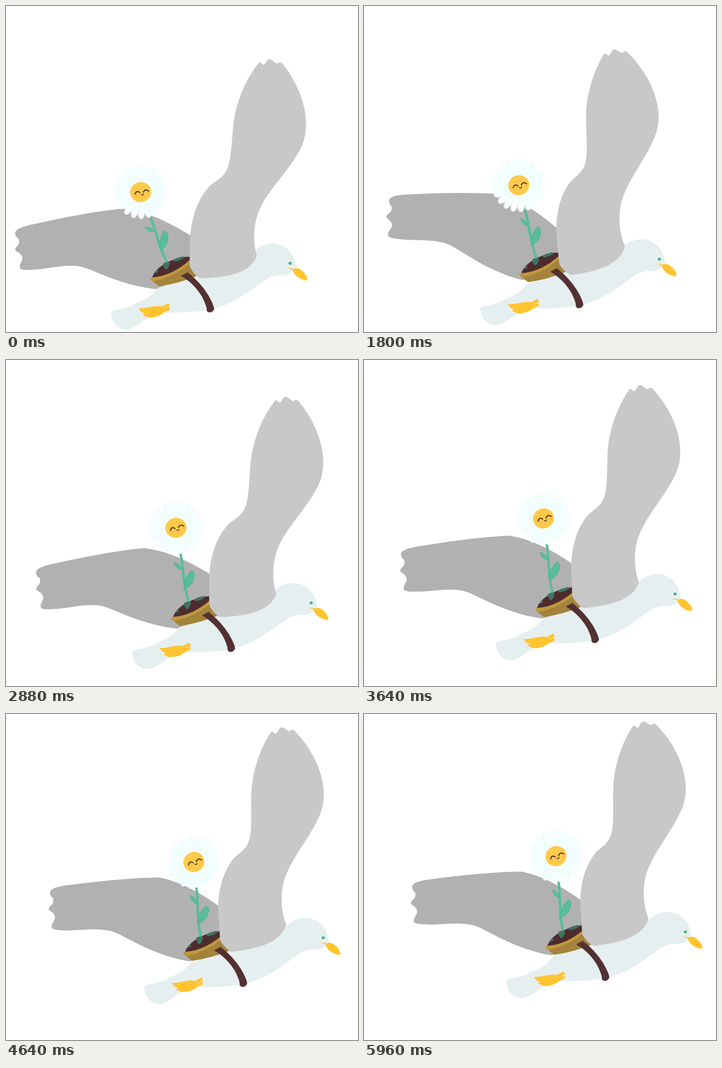
Animation of 700x650 px, one loop 6 s. Source, as an HTML page with a canvas:

```html
<!DOCTYPE html>
<html lang="en">
<head>
<meta charset="utf-8">
<title>Flying gull with a daisy</title>
<style>
html, body { margin: 0; width: 100%; height: 100%; overflow: hidden; background: #fff; }
canvas { display: block; }
</style>
</head>
<body>
<canvas id="stage" width="700" height="650"></canvas>
<script>
const ctx = document.getElementById('stage').getContext('2d');
const LOOP = 6000, FRAME = 40, STEP = 640;

// Motion tracks, one value every STEP ms
const track = {
  x: [0, 3.8, 12.8, 24.5, 36, 47, 56, 64, 70, 73.5, 74.3],
  y: [0, 0, -2.5, -10, -21.5, -36.5, -51, -64, -74, -78, -79.3],
  nearWing: [0, 4.2, 7.6, 6.3, 1.7, 1.2, 4.3, 5, 5.2, 5.2, 5.2],
  farWing: [0, 6.3, 11.1, 8.9, 1.4, 0.2, 4.5, 5.1, 5.1, 5.1, 5.1],
  drift: [0, 0, 0, 0, -2, -3.5, -5, -5.5, -5.5, -5.5, -5.5],
  plant: [0, 2.3, 4.7, 7.2, 9.6, 11.9, 14.1, 15, 15.1, 15.1, 15.1]
};

const shape = {
  farWing: 'M366 457C330 435 285 410 232 404C170 410 100 425 50 436Q18 443 18 453Q19 461 25 464Q29 474 20 481Q16 487 22 490C30 494 34 500 32 506C29 514 24 520 30 525Q36 527 50 526C80 525 105 517 130 518C150 517 165 525 185 533C225 550 265 562 305 565L380 545V464Z',
  nearWing: 'M499 498C490 470 492 430 506 402C525 362 566 325 587 282C610 235 591 165 548 113Q543 111 539 115C533 113 530 106 524 106C518 106 516 117 512 117C508 117 507 109 502 114C478 145 463 180 455 217C449 250 450 290 443 315C437 342 418 347 405 359C378 388 366 430 366 475L365 518Q372 535 386 543C440 541 485 534 499 498Z',
  body: 'M209 610C225 602 242 605 258 593C272 586 288 583 302 562L385 536L490 492C505 474 530 470 545 476C565 483 575 502 577 522C572 533 556 538 540 537C525 538 512 548 500 557C480 572 455 590 425 600C400 608 370 612 330 611C305 612 285 620 270 630C255 643 240 648 228 643C214 636 209 622 209 610Z',
  beak: 'M559 522L573 524Q580 520 590 529Q600 538 599 547Q588 547 578 539Q572 534 570 526Z',
  foot: 'M264 603Q276 603 288 600Q300 597 310 599L323 592L326 598L312 604L325 600L326 606Q316 609 309 615Q298 622 283 621L272 616L276 613Q268 611 264 603Z',
  strap: 'M348 538L361 531Q386 550 402 576Q413 595 414 604Q411 611 405 611Q400 610 399 607Q400 600 390 580Q374 553 348 538Z',
  soil: 'M290 543Q296 520 335 505Q355 498 370 501L368 508Q345 530 290 545Z',
  rim: 'M287 545Q288 541 291 541Q332 538 368 504L371 509Q335 542 291 549Z',
  pot: 'M291 548Q335 541 369 508L380 538Q345 553 304 559Z',
  moss: 'M312 514Q319 508 326 512Q325 520 319 526Q314 524 312 514ZM332 507L338 503L352 499L355 502L346 507L336 510ZM296 532Q299 526 303 527L301 532Z',
  stem: 'M286 419C299 446 300 473 322 515',
  smallLeaf: 'M295 450Q290 439 276 441Q281 451 295 450Z',
  bigLeaf: 'M306 487Q304 460 314 449Q324 449 322 466Q320 482 306 487Z',
  eyes: 'M-12 2Q-7 -6 -2 1M5 1Q10 -6 16 1',
  mouth: 'M0 4.5Q3 8 5 4.5'
};
for (const name in shape) shape[name] = new Path2D(shape[name]);

// Smooth curve through the values of a track
function sample(list, time) {
  const i = Math.floor(time / STEP), u = time / STEP - i;
  const a = list[Math.max(i - 1, 0)], b = list[i], c = list[i + 1];
  const d = list[Math.min(i + 2, list.length - 1)];
  return b + u / 2 * (c - a + u * (2 * a - 5 * b + 4 * c - d + u * (3 * (b - c) + d - a)));
}

function fill(name, color) {
  ctx.fillStyle = color;
  ctx.fill(shape[name]);
}

function line(name, color, width) {
  ctx.strokeStyle = color;
  ctx.lineWidth = width;
  ctx.stroke(shape[name]);
}

function oval(x, y, rx, ry, color) {
  ctx.fillStyle = color;
  ctx.beginPath();
  ctx.ellipse(x, y, rx, ry, 0, 0, 2 * Math.PI);
  ctx.fill();
}

function turn(degrees) {
  ctx.rotate(degrees * Math.PI / 180);
}

function spin(x, y, degrees) {
  ctx.translate(x, y);
  turn(degrees);
  ctx.translate(-x, -y);
}

function group(draw) {
  ctx.save();
  draw();
  ctx.restore();
}

function petals(color, edge, offset) {
  const count = 20;
  for (let i = 0; i < count; i++) group(() => {
    turn((i + offset) * 360 / count);
    oval(34, 0, 19.5, 6.8, color);
    ctx.strokeStyle = edge;
    ctx.lineWidth = 0.5;
    ctx.stroke();
  });
}

function face() {
  oval(0, 0, 21, 20, '#ffca4b');
  oval(-9, 6, 3, 2, '#ffb957');
  oval(14, 5, 3, 2, '#ffb957');
  line('eyes', '#4a2b20', 2);
  line('mouth', '#4a2b20', 1.5);
}

function render(time) {
  const pose = {};
  for (const name in track) pose[name] = sample(track[name], time);

  const tiltFarWing = () => spin(360, 480, pose.farWing);
  const bendPlant = () => spin(322, 517, pose.plant);
  const placeHead = () => {
    bendPlant();
    ctx.translate(268, 371);
    turn(-10 - 1.6 * pose.plant);
  };

  ctx.fillStyle = '#fff';
  ctx.fillRect(0, 0, 700, 650);
  ctx.lineCap = 'round';

  group(() => {
    ctx.translate(pose.x, pose.y);
    group(() => { tiltFarWing(); fill('farWing', '#b1b1b1'); });

    fill('body', '#e6efef');
    fill('soil', '#4e2c2e');
    fill('pot', '#a4833a');
    fill('rim', '#c0983d');

    group(() => {
      bendPlant();
      ctx.lineCap = 'butt';
      line('stem', '#57bd9b', 5);
      fill('bigLeaf', '#57bd9b');
      line('bigLeaf', '#48a888', 0.6);
      spin(295, 450, 2.4 * pose.nearWing);
      fill('smallLeaf', '#57bd9b');
      line('smallLeaf', '#48a888', 0.6);
    });
    fill('moss', '#3f7563');

    group(() => { placeHead(); petals('#f3ffff', '#e6f3f3', 0.45); });
    // Petals turn plain white with a grey back row in front of the wing
    group(() => {
      const base = ctx.getTransform();
      tiltFarWing();
      ctx.clip(shape.farWing);
      ctx.setTransform(base);
      placeHead();
      petals('#e4e6e6', '#d8dada', 0.6);
      petals('#fcfefe', '#e2e6e6', 0.45);
    });
    group(() => { placeHead(); face(); });

    group(() => {
      ctx.translate(pose.drift, pose.drift * 0.6);
      spin(405, 512, -pose.nearWing);
      fill('nearWing', '#c8c8c8');
    });

    fill('strap', '#533132');
    fill('foot', '#ffc42e');
    fill('beak', '#ffc42e');
    oval(564, 513, 4.6, 4.2, '#fafefe');
    oval(565, 513, 3.4, 3.2, '#55b698');
  });
}

function tick(now) {
  render(Math.floor(now % LOOP / FRAME) * FRAME);
  requestAnimationFrame(tick);
}
tick(performance.now());
</script>
</body>
</html>
```
